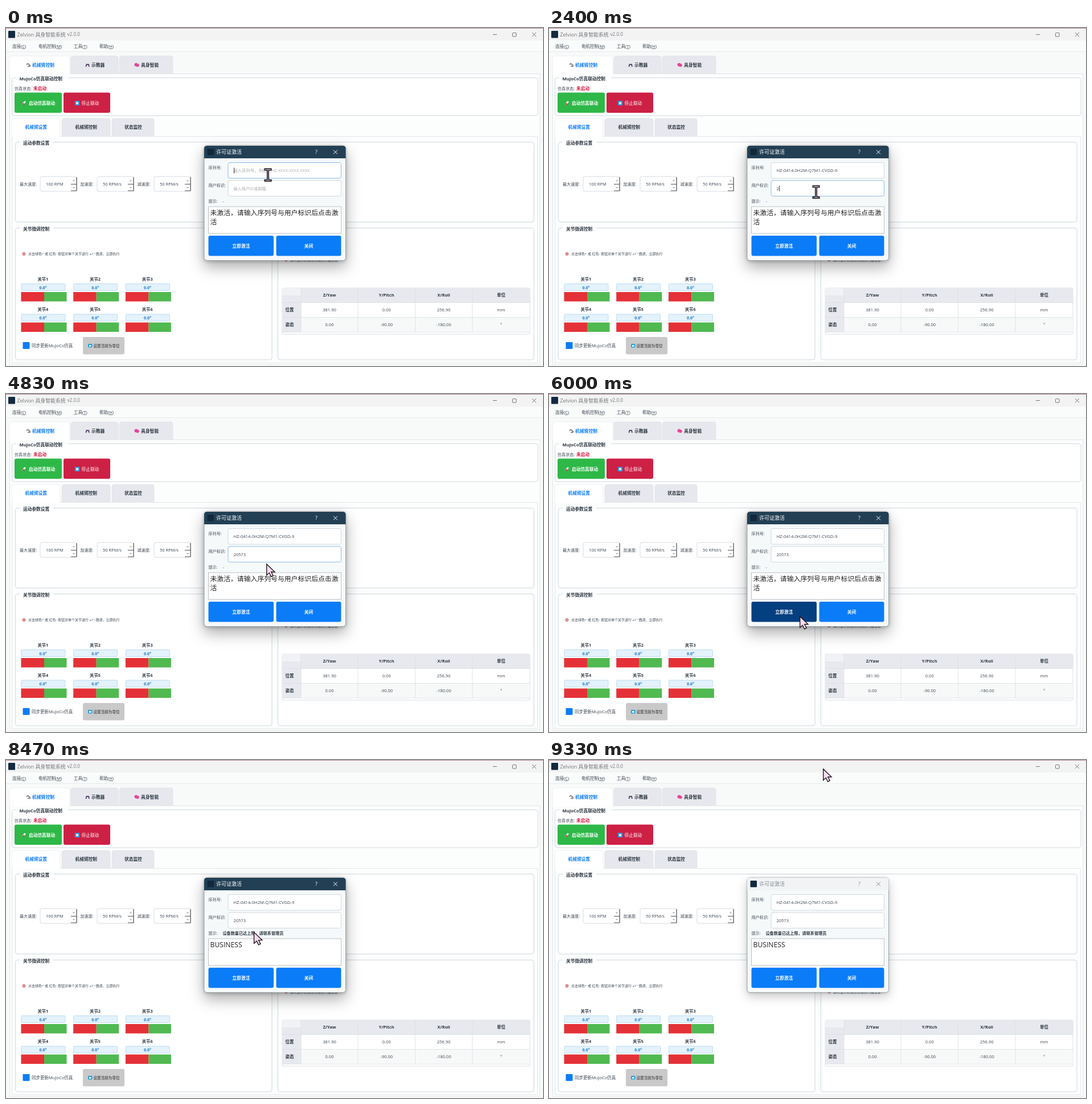
An HTML page that plays this animation: 943 by 594 pixels, repeating every 9530 ms.

```html
<!DOCTYPE html>
<html lang="zh-CN">
<head>
<meta charset="utf-8">
<style>
html, body { margin: 0; width: 100%; height: 100%; overflow: hidden; background: #f8fafa; }
svg { display: block; width: 100vw; height: 100vh; }
text { font-family: "Open Sans", "Noto Sans CJK SC", "Noto Sans CJK", sans-serif; white-space: pre; }
</style>
</head>
<body>
<svg id="stage" viewBox="0 0 943 594"></svg>
<script>
const INK = '#3c4650', DARK = '#2c3640', BLUE = '#0a7cf8', LINE = '#cfd8df', PAGE = '#f8fafa';

// Shape helpers; text is placed by its vertical centre.
const rect = (x, y, x2, y2, fill, stroke = 'none', r = 0, more = '') =>
  `<rect x="${x}" y="${y}" width="${x2 - x}" height="${y2 - y}" rx="${r}" fill="${fill}" stroke="${stroke}" ${more}/>`;
const path = (d, stroke, w = 1, fill = 'none') =>
  `<path d="${d}" stroke="${stroke}" stroke-width="${w}" fill="${fill}"/>`;
const text = (x, y, s, size = 7.5, fill = INK, weight = 400, anchor = 'start', more = '') =>
  `<text x="${x}" y="${y + size * .37}" font-size="${size}" fill="${fill}" font-weight="${weight}" text-anchor="${anchor}" ${more}>${s}</text>`;
const bold = (x, y, s, size = 7.7, fill = DARK) => text(x, y, s, size, fill, 700);
const mid = (x, y, s, size = 7.5, fill = INK, weight = 400) => text(x, y, s, size, fill, weight, 'middle');
const dot = (x, y, r, fill) => `<circle cx="${x}" cy="${y}" r="${r}" fill="${fill}"/>`;

const group = (x, y, x2, y2, title, tx, tw) =>
  rect(x + .5, y + .5, x2, y2, '#fff', LINE, 4) +
  (title ? rect(tx - 6, y - 1, tx + tw + 7, y + 2, '#fcfdfd') + bold(tx, y + 2.5, title) : '');

const tab = (x, y, x2, y2, on) =>
  path(`M${x} ${y2}V${y + 4}q0-4 4-4H${x2 - 4}q4 0 4 4V${y2}`, on ? '#e3e7ea' : '#dfe1e6', .7, on ? '#fff' : '#e7e8ed');

function spin(x, lx, label, value) {
  return text(lx, 274, label, 7.1) + rect(x, 261, x + 64.5, 287, '#fff', '#d5dbe1', 3) +
    text(x + 10, 274, value, 7.5) +
    path(`M${x + 64} 262V286H${x + 54}M${x + 54} 274.5h10`, '#555', 1.2) +
    path(`M${x + 57.5} 268.5h3M${x + 57.5} 280.5h3`, '#777', 1.2);
}

function joint(i) {
  const x = 26.5 + i % 3 * 91.7, y = i > 2 ? 53.5 : 0;
  return mid(x + 38.3, 441 + y, '关节' + (i + 1), 7.3, DARK, 700) +
    rect(x + .5, 449.5 + y, x + 77.5, 461.5 + y, '#e4f2fc', '#bcdcf0', 1) +
    mid(x + 38.5, 456 + y, '0.0°', 7, '#1976d2', 700) +
    rect(x, 464 + y, x + 40.5, 480.5 + y, '#e43137') + rect(x + 40.5, 464 + y, x + 80, 480.5 + y, '#50b950');
}

function table() {
  const edges = [485, 518, 618, 718.5, 819, 920];
  const rows = [['', 'Z/Yaw', 'Y/Pitch', 'X/Roll', '单位'],
    ['位置', '381.90', '0.00', '256.90', 'mm'], ['姿态', '0.00', '-90.00', '-180.00', '°']];
  let s = rect(485, 457, 920, 538, '#fff', '#d9dee3', 2) + rect(485, 457, 920, 482.5, '#e8e9ee') +
    rect(485, 482.5, 518, 534, '#e8e9ee') + rect(518, 508.5, 920, 534, '#f7f9f9') + rect(485, 457, 518, 470, '#f1f2f5');
  s += path('M485 482.5H920M485 508.5H920M485 534.5H920' + edges.slice(1, 5).map(x => `M${x} 457V534`).join(''), '#dadee3', .8);
  rows.forEach((row, r) => row.forEach((v, c) =>
    s += mid((edges[c] + edges[c + 1]) / 2 - (c ? 0 : 3.5), 469.7 + r * 26, v, 7.5, r && c ? INK : DARK, r && c ? 400 : 700)));
  return s;
}

function mainWindow() {
  return rect(0, 0, 943, 594, PAGE) + rect(0, 0, 943, 22, '#f3f3f4') + rect(0, 0, 943, 1, '#b78797') +
    rect(4, 5, 16, 17.5, '#142a40', 'none', 1) +
    text(19.5, 11.3, 'Zelvion', 8.9, '#75787b') + text(51.5, 11.3, '具身智能系统', 8.9, '#75787b') + text(107.5, 11.3, 'v2.0.0', 8.2, '#75787b') +
    path('M855 11.5h7M924 8l7 7m0-7l-7 7', '#666', .9) + rect(889.5, 8.5, 896, 15, 'none', '#666', 1, 'stroke-width=".9"') +
    rect(0, 22, 943, 41, '#fafbfb') + path('M0 41.5H943', '#e4e7e9', .8) +
    [[11, '连接', 'C'], [57, '电机控制', 'M'], [119, '工具', 'T'], [164, '帮助', 'H']].map(([x, s, k]) =>
      text(x, 32.3, `${s}(<tspan text-decoration="underline">${k}</tspan>)`, 7.5)).join('') +
    rect(6.5, 80.5, 937.5, 591, '#fcfdfd', '#e2e6e9') +
    tab(6, 49, 112, 81, 1) + tab(114, 49, 197, 80) + tab(199, 49, 293, 80) +
    path('M36 64.5q3-4 4 0q3 0 2 3h-4', '#68747c', 1.6) + bold(46, 65, '机械臂控制', 7.8, BLUE) +
    path('M140.5 68l1-4h3.500l1 4', '#5b4a74', 2) + bold(150, 65, '示教器', 7.8) +
    dot(228.500, 64.5, 3, '#e8439a') + dot(231, 65.5, 2.7, '#e8439a') + bold(237, 65, '具身智能', 7.8) +
    group(10, 87, 934, 154, 'MuJoCo仿真联动控制', 23.5, 79) +
    text(15, 106, '仿真状态:', 7.1) + bold(48, 106, '未启动', 7.7, '#d3183f') +
    rect(15, 113.5, 98, 149, '#2eb848', 'none', 3) + path('M29 134l5-5', '#e6eef0', 3) + path('M29 132l3 3', '#d6304a', 2) +
    bold(40, 132, '启动仿真联动', 7.7, '#fff') +
    rect(101, 113.5, 183, 149, '#cd2045', 'none', 3) + rect(121, 128, 129, 136, '#2c9ee8', 'none', 1) +
    rect(123.2, 130.2, 126.8, 133.8, '#fff') + bold(132.5, 132, '停止联动', 7.7, '#efb5c0') +
    rect(10.5, 190.5, 933.5, 588, '#fcfdfd', '#e2e6e9') +
    tab(10, 159, 95, 191, 1) + tab(98, 159, 183, 190) + tab(186, 159, 260, 190) +
    bold(33.5, 174.5, '机械臂设置', 7.7, BLUE) + bold(121.5, 174.5, '机械臂控制') + bold(208, 174.5, '状态监控') +
    group(16, 200, 927, 341, '运动参数设置', 30, 46) +
    spin(60, 24, '最大速度:', '100 RPM') + spin(160, 130.5, '加速度:', '50 RPM/s') + spin(260, 230.5, '减速度:', '50 RPM/s') +
    group(16, 351, 467, 583, '关节微调控制', 30, 46) + group(477, 351, 927, 583) +
    dot(31.5, 397, 2.7, '#d0565c') + dot(31.5, 397, 1.3, '#f3d6d6') +
    text(39, 397, '点击绿色+ 或 红色- 按钮对单个关节进行 ±1° 微调，立即执行', 6) +
    [0, 1, 2, 3, 4, 5].map(joint).join('') +
    rect(29.500, 552, 41.5, 564, BLUE, 'none', 1) + text(45, 558.3, '同步更新MuJoCo仿真', 7.5) +
    rect(135, 543, 208, 573.5, '#c9c9c9', 'none', 3) + rect(144, 555, 151.5, 561.5, '#22a5e6', 'none', 1) +
    rect(146, 557, 149.5, 560, '#fff') + bold(153.500, 558.3, '设置当前为零位', 6.6, '#5c5c5c') +
    dot(492, 407.5, 2.7, '#d0565c') + text(499, 407.5, '实时显示机械臂末端执行器位姿', 6) +
    table();
}

function dialog() {
  const button = (x, x2, s, id) => rect(x, 365, x2, 400.500, BLUE, 'none', 3, id) + mid((x + x2) / 2, 383, s, 7.7, '#fff', 700);
  return `<g id="panel">` + rect(348, 207, 596.5, 408.5, '#f6f9fa', '#8d999f', 5, 'stroke-width=".8"') + '</g>' +
    `<path id="bar" d="M348 229V212q0-5 5-5H591.5q5 0 5 5V229z"/>` +
    rect(353.500, 212, 365, 223.500, '#12283c', 'none', 1) +
    `<g id="caption">` + text(369, 217.5, '许可证激活', 9, 'inherit') + mid(545, 217.5, '?', 9, 'inherit') + '</g>' +
    `<path id="shut" d="M575 214.500l7 7m0-7l-7 7" fill="none"/>` +
    text(355.5, 245, '序列号:', 7.1) + text(355.5, 276.500, '用户标识:', 7.1) + text(355.5, 304.500, '提示:', 7.1) +
    rect(390, 236.5, 588.5, 264, '#fff', LINE, 3, 'id="box0"') + rect(390, 268, 588.5, 295.5, '#fff', LINE, 3, 'id="box1"') +
    text(399.500, 250.5, '', 7.6, INK, 400, 'start', 'id="serial"') + text(399.500, 282, '', 7.5, INK, 400, 'start', 'id="user"') +
    rect(0, 0, .9, 10, '#222', 'none', 0, 'id="caret"') +
    text(380.5, 304.500, '', 7.13, DARK, 400, 'start', 'id="hint"') +
    rect(355.5, 314, 588.5, 361, '#fff', '#b4babf', 0, 'stroke-width=".9"') +
    `<g id="before">` + text(358.5, 325, '未激活，请输入序列号与用户标识后点击激', 11.85, '#222') + text(358.5, 341, '活', 11.85, '#222') + '</g>' +
    `<g id="after">` + text(358.5, 324.500, 'BUSINESS', 12.2, '#222') + '</g>' +
    button(355.5, 470, '立即激活', 'id="go"') + button(474.5, 588.5, '关闭', '');
}

const cursors =
  `<g id="arrow">${path('M.7 1V20.500l4.600-4.200 3.300 6.700 3.500-1.700-3.300-6.500h6.200z', '#201822', 1.4, '#fbdcf1')}</g>` +
  `<g id="beam">${path('M-6.500-9.500h13M-6.500 10h13M0-9.500V10', '#100c12', 4)}${path('M-5.200-9.500h10.400M-5.200 10h10.400M0-9.500V10', '#f6dff0', 1)}</g>`;

const stage = document.getElementById('stage');
stage.innerHTML = mainWindow() + dialog() + cursors;
const $ = id => document.getElementById(id);
const set = (id, attrs) => { for (const k in attrs) $(id).setAttribute(k, attrs[k]); };
const show = (id, on) => set(id, { visibility: on ? 'visible' : 'hidden' });

// Pointer stops: time, x, y
const stops = [[0, 460, 258], [1529, 460, 258], [1530, 475, 288], [2199, 475, 288], [2200, 469, 288],
  [4000, 469, 288], [4070, 471, 288], [4270, 471, 288], [4450, 520, 292], [4560, 541, 306], [4700, 500, 302],
  [4830, 457, 298], [4870, 457, 298], [5200, 449, 361], [5370, 440, 390], [7629, 440, 390], [7630, 417, 286], [7670, 417, 286],
  [7830, 400, 302], [7999, 400, 302], [8000, 413, 362], [8400, 413, 362], [8650, 490, 150], [8900, 531, 36],
  [8930, 531, 36], [9130, 512, 24], [9330, 481, 15], [9530, 481, 15]];

function pointer(t) {
  const i = Math.max(1, stops.findIndex(s => s[0] > t));
  const [t0, x0, y0] = stops[i - 1], [t1, x1, y1] = stops[i], k = (t - t0) / (t1 - t0);
  return [x0 + (x1 - x0) * k, y0 + (y1 - y0) * k];
}

const typed = [2370, 2970, 3070, 3170, 4030];
const within = (t, ...spans) => spans.some(([a, b]) => t >= a && t < b);

function draw(t) {
  const [x, y] = pointer(t), active = t < 9330;
  const inside = (x0, y0, x1, y1) => x >= x0 && x <= x1 && y >= y0 && y <= y1;
  const beam = inside(390, 236.5, 588, 264) || inside(390, 268, 588, 295.5) || inside(356, 314, 588, 361);
  show('beam', beam);
  show('arrow', !beam);
  set(beam ? 'beam' : 'arrow', { transform: `translate(${x} ${y})` });

  const pasted = t >= 1030, focus = t < 1960 ? 0 : t < 5600 ? 1 : 2;
  const keys = typed.filter(k => t >= k).length, done = t >= 6100;
  [0, 1].forEach(i => set('box' + i, { stroke: focus === i ? '#8bbbe8' : LINE }));
  $('serial').textContent = pasted ? 'HZ-0414-0H2M-Q7M1-CVGD-9' : '输入序列号，例如：HZ-XXXX-XXXX-XXXX';
  set('serial', { fill: pasted ? INK : '#a9adb0', 'font-size': pasted ? 7.6 : 7.36 });
  $('user').textContent = keys ? '20573'.slice(0, keys) : '输入用户ID或邮箱';
  set('user', { fill: keys ? INK : '#a9adb0', 'font-size': keys ? 7.5 : 7.15 });
  show('caret', focus < 2 && !within(t, [400, 1000], [1530, 1960], [3500, 4000], [4570, 5100]));
  set('caret', focus ? { x: 400 + keys * 4.29, y: 277 } : { x: pasted ? 507 : 400, y: 245.5 });

  $('hint').textContent = done ? '设备数量已达上限，请联系管理员' : '-';
  set('hint', { 'font-weight': done ? 600 : 400 });
  show('before', !done);
  show('after', done);
  set('go', { fill: within(t, [5600, 6170]) ? '#043f80' : inside(355.5, 365, 470, 400.5) ? '#0056b3' : BLUE });

  const ink = active ? '#fff' : '#858a8d';
  set('bar', { fill: active ? '#223f54' : '#f1f3f4' });
  for (const el of $('caption').children) el.setAttribute('fill', ink);
  set('shut', { stroke: ink });
  $('panel').style.filter = active
    ? 'drop-shadow(0 1px 3px rgba(0,0,0,.25)) drop-shadow(0 11px 13px rgba(0,0,0,.32))'
    : 'drop-shadow(0 1px 2px rgba(0,0,0,.15)) drop-shadow(0 7px 9px rgba(0,0,0,.2))';
}

const start = performance.now();
function tick() {
  draw((performance.now() - start) % 9530);
  requestAnimationFrame(tick);
}
tick();
</script>
</body>
</html>
```
